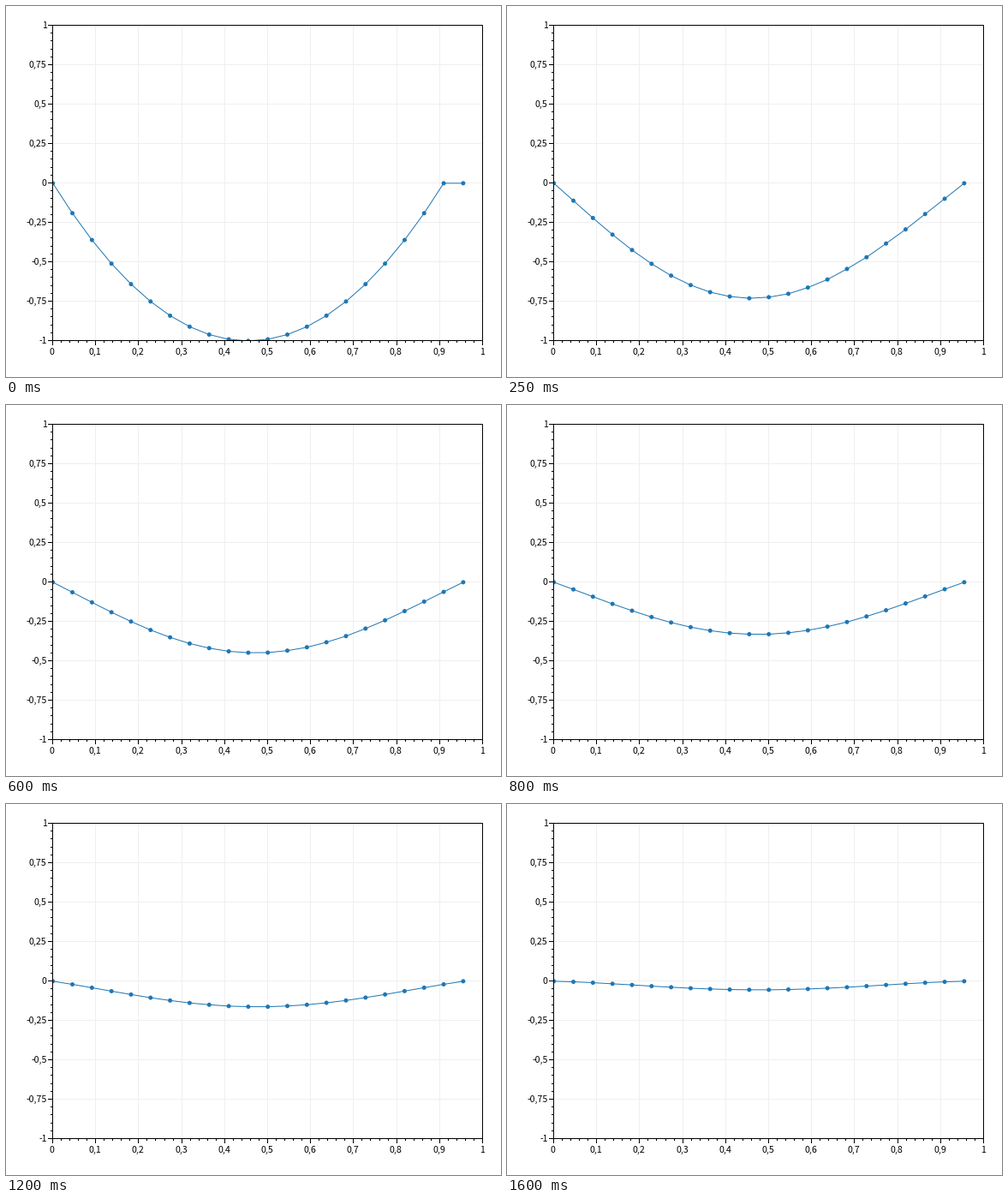
These frames come from a looping animation (578x433 px, 1.65 s). A matplotlib script:

```python
import numpy as np
import matplotlib.pyplot as plt
from matplotlib.animation import FuncAnimation
from matplotlib.collections import EllipseCollection
from matplotlib.patches import Rectangle

W, H, DPI = 578, 433, 64
PX = 72 / DPI  # one pixel in points
LEFT, RIGHT, TOP, BOTTOM = 54.5, 556.5, 22.5, 390.5
BLUE, GRID = "#1f77b4", "#efefef"

FRAMES, INTERVAL = 33, 50
N, STEPS = 22, 5
DX = 1 / 20
DT = DX ** 2 / 2
SOURCE = 0.98


def to_x(v):
    return LEFT + v * (RIGHT - LEFT)


def to_y(v):
    return (TOP + BOTTOM) / 2 - v * (BOTTOM - TOP) / 2


def solve():
    """Explicit heat equation with a constant source and ends held at zero."""
    s = np.minimum(np.arange(N) * DX, 1)
    u = -4 * s * (1 - s)
    history = [u]
    for _ in range(FRAMES - 1):
        for _ in range(STEPS):
            new = np.zeros(N)
            new[1:-1] = (u[:-2] + u[2:]) / 2 + SOURCE * DT
            u = new
        history.append(u)
    return history


fig = plt.figure(figsize=(W / DPI, H / DPI), dpi=DPI, facecolor="white")
ax = fig.add_axes([0, 0, 1, 1])
ax.set_xlim(0, W)
ax.set_ylim(H, 0)
ax.axis("off")


def stroke(x0, y0, x1, y1, color="black", z=5):
    ax.plot([x0, x1], [y0, y1], color=color, lw=PX, zorder=z,
            solid_capstyle="butt", snap=False)


def label(x, y, value, ha):
    ax.text(x, y, f"{value:g}".replace(".", ","), ha=ha, va="baseline",
            family="Noto Sans CJK JP", size=10.6 * PX, color="black")


def center(p):
    """Middle of the pixel that holds p."""
    return np.floor(p + 1e-6) + 0.5


# Grid, ticks and labels
for k in range(11):
    x = center(to_x(k / 10))
    stroke(x, TOP, x, BOTTOM, GRID, 1)
    stroke(x, 390, x, 396)
    label(to_x(k / 10) - 0.7, 407, k / 10, "center")
for k in range(-4, 5):
    y = center(to_y(k / 4))
    stroke(LEFT, y, RIGHT, y, GRID, 1)
    stroke(49, y, 55, y)
    label(47.6, y + 3.9, k / 4, "right")
for k in range(51):
    x = center(to_x(k / 50))
    stroke(x, 390, x, 393)
for k in range(-20, 21):
    y = center(to_y(k / 20))
    stroke(52, y, 55, y)

ax.add_patch(Rectangle((LEFT, TOP), RIGHT - LEFT, BOTTOM - TOP, fill=False,
                       ec="black", lw=PX, zorder=6, snap=False))

# Curve
history = solve()
xs = to_x(np.arange(N) / N) + 0.2
clip = Rectangle((54, 22), 503, 369, transform=ax.transData)
line, = ax.plot(xs, to_y(history[0]), color=BLUE, lw=PX, zorder=3, snap=False)
dots = EllipseCollection([5] * N, [5] * N, [0] * N, units="xy",
                         offsets=np.column_stack([xs, to_y(history[0])]),
                         offset_transform=ax.transData,
                         facecolors=BLUE, edgecolors="none", zorder=4)
ax.add_collection(dots, autolim=False)
for artist in (line, dots):
    artist.set_clip_path(clip)


def update(i):
    ys = to_y(history[i]) + 0.35
    line.set_ydata(ys)
    dots.set_offsets(np.column_stack([xs, ys]))
    return line, dots


anim = FuncAnimation(fig, update, frames=FRAMES, interval=INTERVAL,
                     repeat=True, repeat_delay=0)
plt.show()
```
